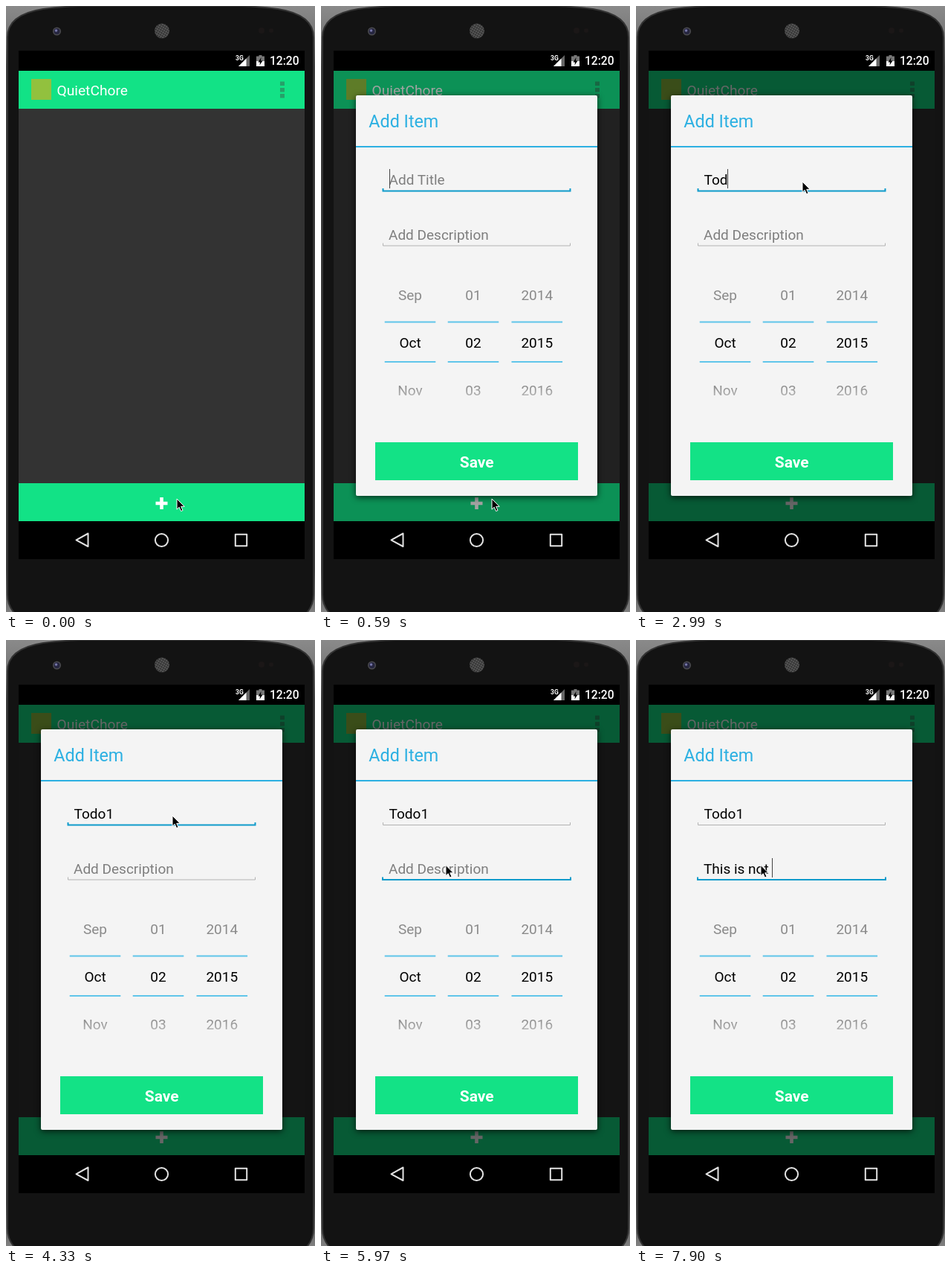
Recreate the animation shown at these times as an HTML page. Size 416 by 814 pixels, loop 8 s.

```html
<!DOCTYPE html>
<html lang="en">
<head>
<meta charset="utf-8">
<title>Todo app</title>
<style>
html, body { margin: 0; width: 100%; height: 100%; overflow: hidden; background: #131313; }
svg { display: block; width: 416px; height: 814px; }
text { font-family: Roboto, sans-serif; font-size: 19px; white-space: pre; }
.mid { text-anchor: middle; }
.bold { font-weight: 700; }
#dialog { transform-origin: 209.5px 389px; }
#card { filter: drop-shadow(0 2px 4px rgba(0, 0, 0, .7)); }
.nav { fill: none; stroke: #e2e2e2; stroke-width: 2; stroke-linejoin: round; }
.line { fill: none; }
</style>
</head>
<body>
<svg viewBox="0 0 416 814">
  <defs>
    <linearGradient id="edge" x2="0" y2="1">
      <stop offset="0" stop-color="#8a8a8a"/>
      <stop offset=".05" stop-color="#777"/>
      <stop offset=".1" stop-color="#444"/>
      <stop offset=".93" stop-color="#444"/>
      <stop offset="1" stop-color="#808080"/>
    </linearGradient>
    <linearGradient id="fade" gradientUnits="userSpaceOnUse" y1="508" y2="525" x2="0">
      <stop offset="0" stop-color="#868686"/>
      <stop offset="1" stop-color="#b4b4b4"/>
    </linearGradient>
    <pattern id="mesh" width="3" height="3" patternUnits="userSpaceOnUse" patternTransform="rotate(30)">
      <rect width="3" height="3" fill="#5c5c5c"/>
      <circle cx="1.5" cy="1.5" r="1.05" fill="#1b1b1b"/>
    </pattern>
  </defs>

  <!-- phone -->
  <rect width="416" height="814" fill="url(#edge)"/>
  <path d="M2 42C2 22 18 9 50 4Q72 1 100 0H316Q344 1 366 4C398 9 414 22 414 42V790Q414 806 404 816H12Q2 806 2 790Z"
        fill="#131313" stroke="#333" stroke-width="2"/>
  <circle cx="68.5" cy="34" r="5.5" fill="#4c4c50"/>
  <circle cx="68.5" cy="34" r="4" fill="#25253f"/>
  <circle cx="67.5" cy="33" r="1.8" fill="#7676a8"/>
  <circle cx="210" cy="33.5" r="10" fill="url(#mesh)"/>
  <g fill="#1b1717"><circle cx="344" cy="33" r="4"/><circle cx="357" cy="33" r="3"/></g>

  <!-- system bars -->
  <path d="M17 60H402V87H17ZM17 692H402V743H17Z"/>
  <text class="bold" x="309" y="73" fill="#fff" style="font-size:8.5px">3G</text>
  <path d="M313 81L328 66V81Z" fill="#666"/>
  <path d="M313 81L323.5 70.5V81Z" fill="#fff"/>
  <path d="M337 67.5H340.5V66H344.5V67.5H348V74H337Z" fill="#777"/>
  <path d="M337 74H348V81H337Z" fill="#fff"/>
  <path d="M343.5 69L339.5 75.5H342L341.5 79.5L345.5 73.5H343Z"/>
  <text x="355" y="79" fill="#fff" style="font-size:15.6px;font-weight:500">12:20</text>
  <g class="nav">
    <path d="M94.5 717.3L110.5 708.5V726Z"/>
    <circle cx="209.5" cy="717.5" r="8.6"/>
    <path d="M308.8 709.8H324.2V725.2H308.8Z"/>
  </g>

  <!-- app -->
  <path d="M17 87H402V692H17Z" fill="#333"/>
  <path d="M17 87H402V138H17ZM17 641H402V692H17Z" fill="#12e286"/>
  <rect x="34" y="98" width="27" height="28" fill="#92c13e"/>
  <text x="68.5" y="120" fill="#fff" style="font-size:19.2px">QuietChore</text>
  <path d="M369 101.5h6v5.5h-6zm0 8.5h6v5.5h-6zm0 8h6v5.5h-6z" fill="#26a069"/>
  <path d="M201.5 668H217.5M209.5 660V676" stroke="#fff" stroke-width="4.6"/>
  <rect id="dim" x="17" y="87" width="385" height="605"/>

  <g id="dialog">
    <rect id="card" x="47" y="120" width="325" height="538" rx="2" fill="#f4f4f4"/>
    <text x="64.3" y="163" fill="#2cb0e2" style="font-size:23.3px">Add Item</text>
    <path d="M47 189H372" stroke="#2cb0e2" stroke-width="2"/>
    <path id="line0" class="line"/>
    <path id="line1" class="line"/>
    <text id="field0" x="91.6" y="240"/>
    <text id="field1" x="91" y="314"/>
    <rect id="caret" width="1" height="26" fill="#444"/>
    <g id="picker"></g>
    <rect x="73" y="586" width="273" height="51" fill="#13e286"/>
    <text class="mid bold" x="209.7" y="619.5" fill="#fff" style="font-size:21px">Save</text>
  </g>

  <path id="mouse" d="M0 0V14.2L3.2 11.2L5.6 16.6L8 15.5L5.7 10.3H10.2Z" stroke="#fff" stroke-width="1"/>
</svg>
<script>
const LOOP = 8000;
const $ = id => document.getElementById(id);
const set = (el, attrs) => { for (const k in attrs) el.setAttribute(k, attrs[k]); };

const columns = [
  [120, 'Sep', 'Oct', 'Nov'],
  [205, '01', '02', '03'],
  [290.8, '2014', '2015', '2016']
];
$('picker').innerHTML = columns.map(([x, prev, now, next]) => `
  <path d="M${x - 34.3} 424.5h68.6m0 53.5h-68.6" fill="none" stroke="#60c5ea" stroke-width="2"/>
  <text class="mid" x="${x}" y="395" fill="#8a8a8a">${prev}</text>
  <text class="mid" x="${x}" y="459">${now}</text>
  <text class="mid" x="${x}" y="523" fill="url(#fade)">${next}</text>`).join('');

const fields = [
  { hint: 'Add Title', base: 249, top: 219 },
  { hint: 'Add Description', base: 322.5, top: 293 }
];

// Each step changes only the listed values.
const steps = [
  [0, { open: 0, zoom: 1, dim: 0, texts: ['', ''], focus: 0, caret: 1 }],
  [440, { open: .85, zoom: .987, dim: .2 }],
  [590, { open: 1, zoom: 1, dim: .36 }],
  [740, { dim: .5 }],
  [890, { dim: .6 }],
  [1040, { caret: .07 }],
  [1190, {}],
  [1340, {}],
  [2690, { texts: ['T', ''], caret: 0 }],
  [2990, { texts: ['Tod', ''], caret: 1 }],
  [3140, { texts: ['Todo', ''] }],
  [3580, { caret: 0 }],
  [3880, { texts: ['Todo1', ''], caret: 1 }],
  [4330, { caret: 0 }],
  [4780, { caret: 1 }],
  [4930, {}],
  [5080, {}],
  [5220, {}],
  [5370, { focus: 1 }],
  [5970, { caret: 0 }],
  [6270, { texts: ['Todo1', 'T'], caret: 1 }],
  [6560, { texts: ['Todo1', 'Thi'] }],
  [6710, { texts: ['Todo1', 'This'] }],
  [7010, { texts: ['Todo1', 'This '] }],
  [7160, { texts: ['Todo1', 'This i'] }],
  [7300, { texts: ['Todo1', 'This is '] }],
  [7600, { texts: ['Todo1', 'This is n'] }],
  [7750, { texts: ['Todo1', 'This is no'] }],
  [7900, { texts: ['Todo1', 'This is not '] }]
];

const ease = (t, from, to) => {
  const p = Math.min(1, Math.max(0, (t - from) / (to - from)));
  return p * p * (3 - 2 * p);
};

function drawField(i, state) {
  const { hint, base } = fields[i], text = state.texts[i], on = state.focus === i;
  const el = $('field' + i), out = on && i ? .5 : 0;
  el.textContent = text || hint;
  set(el, { fill: text ? '#000' : '#7e7e7e' });
  set($('line' + i), {
    d: `M${83.5 - out} ${base - 4}V${base - (on ? .5 : 0.5)}H${335.5 + out}V${base - 4}`,
    stroke: on ? '#0f9bcb' : '#b2b2b2',
    'stroke-width': on ? 2 : 1
  });
}

function draw(index) {
  const state = Object.assign({}, ...steps.slice(0, index + 1).map(s => s[1]));
  const time = steps[index][0];
  set($('dim'), { opacity: state.dim });
  $('dialog').style.opacity = state.open;
  $('dialog').style.transform = `scale(${state.zoom})`;
  fields.forEach((_, i) => drawField(i, state));

  const el = $('field' + state.focus);
  const width = state.texts[state.focus] ? el.getComputedTextLength() : 0;
  set($('caret'), {
    x: Math.floor(+el.getAttribute('x') + width + .4),
    y: fields[state.focus].top,
    opacity: state.caret
  });

  const a = ease(time, 590, 1340), b = ease(time, 4630, 5370);
  set($('mouse'), { transform: `translate(${230 - 6 * a - 56 * b} ${662 - 426 * a + 66.5 * b})` });
}

let shown = -1;
function tick() {
  const t = performance.now() % LOOP;
  const index = steps.filter(s => s[0] <= t).length - 1;
  if (index !== shown) draw(shown = index);
  requestAnimationFrame(tick);
}
tick();
</script>
</body>
</html>
```
